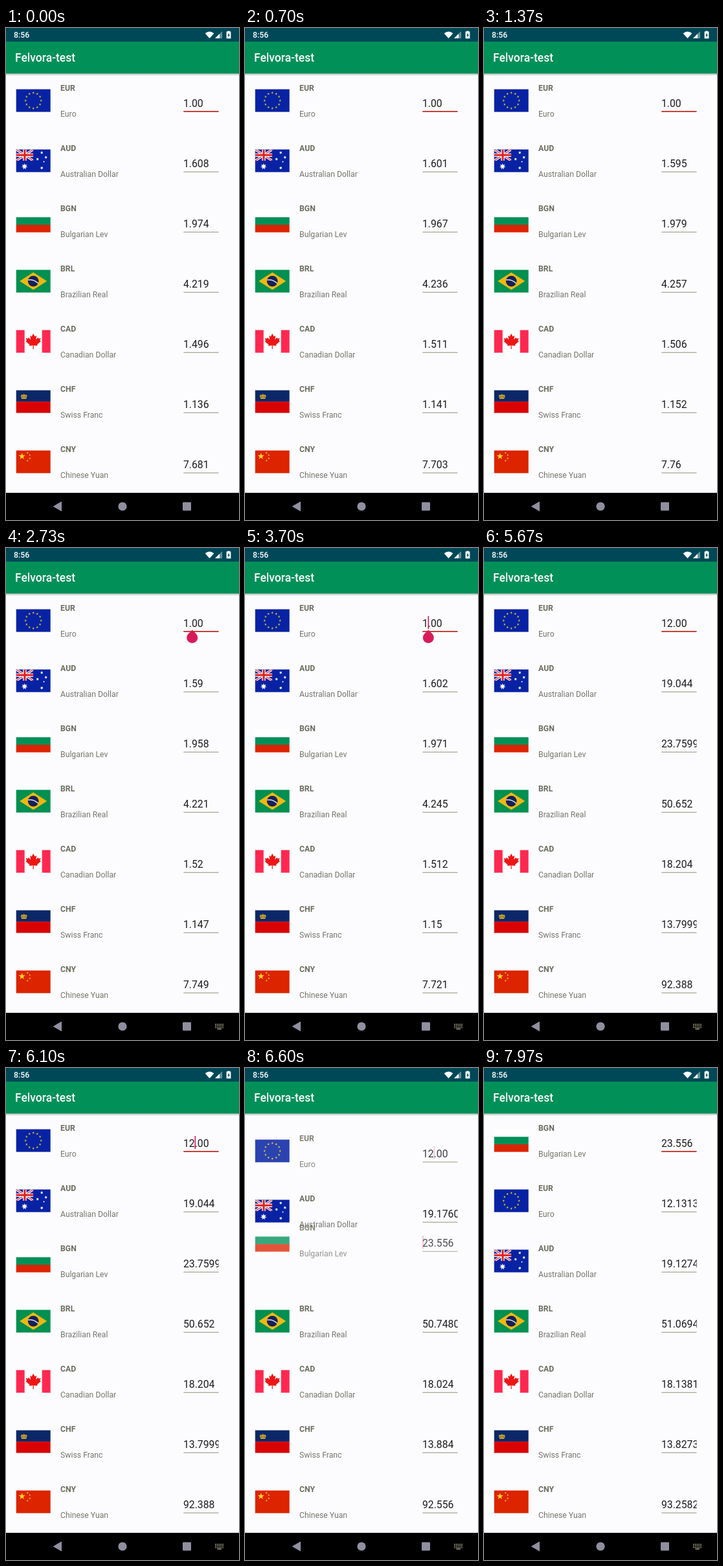
Write an HTML page that moves like this. It is 360 by 760 pixels and loops after 8 s.

```html
<!DOCTYPE html>
<html lang="en">
<head>
<meta charset="utf-8">
<title>Currency list</title>
<style>
  html, body { margin: 0; width: 100%; height: 100%; overflow: hidden; background: #fcfcff; }
  svg { display: block; width: 100vw; height: 100vh; font-family: Roboto, "Noto Sans", sans-serif; }
  .code { font-size: 12.25px; font-weight: 700; fill: #6c6c5e; }
  .name { font-size: 12.25px; fill: #75756a; }
  .value { font-size: 15.76px; fill: #1c1c1c; }
  .bar { font-weight: 500; fill: #fff; }
</style>
</head>
<body>
<svg id="stage" viewBox="0 0 360 760">
  <defs>
    <linearGradient id="shade" x1="0" y1="0" x2="0" y2="1">
      <stop offset="0" stop-color="#a9b7b4"/>
      <stop offset="1" stop-color="#fcfcff"/>
    </linearGradient>
    <clipPath id="field"><rect x="273" y="100" width="55.6" height="30"/></clipPath>
    <clipPath id="canton"><rect width="26.5" height="17.5"/></clipPath>
  </defs>
  <rect width="360" height="760" fill="#fcfcff"/>
  <g id="list"></g>

  <rect y="70" width="360" height="4" fill="url(#shade)"/>
  <rect y="20" width="360" height="50.3" fill="#009058"/>
  <rect width="360" height="21" fill="#004858"/>
  <text class="bar" x="12" y="15.4" font-size="12.3">8:56</text>
  <text class="bar" x="14" y="52.4" font-size="17.5">Felvora-test</text>
  <g fill="#fff">
    <path d="M307.6 8.2Q314.5 3 321.4 8.2L314.5 16Z"/>
    <path d="M323 16L334 5V16Z" opacity=".4"/>
    <path d="M323 16L330 9V16Z"/>
    <path d="M342.5 5.6V4.6H345.5V5.6H347.4V16.2H340.6V5.6Z"/>
    <path d="M344.6 7.5L342.2 11.6H343.7V14.6L346 10.4H344.6Z" fill="#004858"/>
  </g>

  <rect y="718" width="360" height="42" fill="#000"/>
  <g fill="#8f8fa0">
    <path d="M73.5 739L85.5 732V746Z" stroke="#8f8fa0" stroke-linejoin="round"/>
    <circle cx="180" cy="739" r="6.6"/>
    <rect x="273" y="732.5" width="13" height="13" rx="1"/>
  </g>
  <g id="keys" fill="#a2a284"></g>
</svg>

<script>
const LOOP = 8000, ROW = 93;
const TAP = 2200, DRAG = 3450, TYPE = 4000, PICK = 6270;
const MOVE = 6514, MOVE_MS = 320, RATE = 250;
const GREY = '#9a9a82', FOCUS = '#c03a32', ACCENT = '#d81b58';
const $ = id => document.getElementById(id);

const rect = (x, y, w, h, fill) =>
  `<rect x="${x}" y="${y}" width="${w}" height="${h}" fill="${fill}"/>`;
const path = (d, fill, extra = '') => `<path d="${d}" fill="${fill}" ${extra}/>`;

function star(x, y, r, fill, points = 5, inner = .4) {
  let d = '';
  for (let i = 0; i < points * 2; i++) {
    const a = Math.PI * i / points, k = i % 2 ? r * inner : r;
    d += (i ? 'L' : 'M') + (x + k * Math.sin(a)).toFixed(2) + ' ' + (y - k * Math.cos(a)).toFixed(2);
  }
  return path(d + 'Z', fill);
}

// Flags are drawn in a 53 x 35 box.
function euFlag() {
  let s = rect(0, 0, 53, 35, '#0822a4');
  for (let i = 0; i < 12; i++) {
    const a = i * Math.PI / 6;
    s += star(26.5 + 12 * Math.sin(a), 17.5 - 12 * Math.cos(a), 2, '#d8c820');
  }
  return s;
}

function auFlag() {
  const diag = 'M0 0L26.5 17.5M26.5 0L0 17.5', cross = 'M13.25 0V17.5M0 8.75H26.5';
  const line = (d, c, w) => path(d, 'none', `stroke="${c}" stroke-width="${w}"`);
  const stars = [[39.5, 5, 2.4], [46, 12.2, 2.4], [33, 15, 2.4], [39.5, 28.5, 2.6], [42.8, 19, 1.5]];
  return rect(0, 0, 53, 35, '#0822a4') + '<g clip-path="url(#canton)">' +
    line(diag, '#fff', 3.6) + line(diag, '#e02830', 1.2) +
    line(cross, '#fff', 5.4) + line(cross, '#e02020', 3) + '</g>' +
    star(13, 26.3, 5, '#fff', 7, .46) +
    stars.map(([x, y, r]) => star(x, y, r, '#fff', 7, .46)).join('');
}

function brFlag() {
  return rect(0, 0, 53, 35, '#009050') +
    path('M26.5 4L47.5 17.5L26.5 31L5.5 17.5Z', '#f0b810') +
    '<circle cx="26.5" cy="17.5" r="8.4" fill="#14205c"/>' +
    path('M18.6 15.6Q27.5 14.4 34 20.8', 'none', 'stroke="#dfe6e8" stroke-width="1.5"');
}

function caFlag() {
  const half = [[0, -12], [2.4, -7.6], [5, -8.8], [3.9, -2.6], [7.3, -6], [8, -4.3], [11.5, -4.8],
    [10.2, -1.2], [11.8, -.2], [5.8, 4.8], [6.4, 7], [.6, 6.2], [.6, 12]];
  const all = half.concat(half.slice().reverse().map(([x, y]) => [-x, y]));
  const d = 'M' + all.map(([x, y]) => `${26.5 + x} ${17.5 + y}`).join('L') + 'Z';
  return rect(0, 0, 53, 35, '#fff') + rect(0, 0, 13, 35, '#ff2850') +
    rect(40, 0, 13, 35, '#ff2850') + path(d, '#f01414');
}

function liFlag() {
  return rect(0, 0, 53, 17.5, '#0a2868') + rect(0, 17.5, 53, 17.5, '#d80404') +
    path('M8.5 13.5L7 8.5Q7.5 6 11 7.2L12 5L13 7.2Q16.5 6 17 8.5L15.5 13.5Z', '#c0a030') +
    path('M9 10.2H11M13 10.2H15', 'none', 'stroke="#4c4830" stroke-width="1.3"');
}

function cnFlag() {
  return rect(0, 0, 53, 35, '#dc2400') + star(9, 9, 5.3, '#ffd820') +
    [[17.5, 3.6], [21, 7], [21, 12.2], [17.5, 15.8]]
      .map(([x, y]) => star(x, y, 1.8, '#f8c020')).join('');
}

const bgFlag = () => rect(0, 0, 53, 12, '#fff') +
  rect(0, 11.7, 53, 11.8, '#009058') + rect(0, 23.4, 53, 11.6, '#dc2400');

const CURRENCIES = [
  ['EUR', 'Euro', euFlag],
  ['AUD', 'Australian Dollar', auFlag],
  ['BGN', 'Bulgarian Lev', bgFlag],
  ['BRL', 'Brazilian Real', brFlag],
  ['CAD', 'Canadian Dollar', caFlag],
  ['CHF', 'Swiss Franc', liFlag],
  ['CNY', 'Chinese Yuan', cnFlag]
];

// One line per refresh, a second apart.
const RATES = [
  '1.00 1.608 1.974 4.219 1.496 1.136 7.681',
  '1.00 1.601 1.967 4.236 1.511 1.141 7.703',
  '1.00 1.595 1.979 4.257 1.506 1.152 7.76',
  '1.00 1.59 1.958 4.221 1.52 1.147 7.749',
  '1.00 1.602 1.971 4.245 1.512 1.15 7.721',
  '12.00 19.308 23.7000 51.036 18.096 13.884 93.336',
  '12.00 19.044 23.7599 50.652 18.204 13.7999 92.388',
  '12.00 19.1760 23.556 50.7480 18.024 13.884 92.556',
  '12.1313 19.1274 23.556 51.0694 18.1381 13.8273 93.2582'
].map(s => s.split(' '));

$('list').innerHTML = CURRENCIES.map(([code, name, flag]) => `<g>
  <g transform="translate(15.7 94.6)">${flag()}</g>
  <text class="code" x="84" y="97.3">${code}</text>
  <text class="name" x="84" y="136.6">${name}</text>
  <g clip-path="url(#field)"><text class="value" x="274" y="121.8"></text></g>
  <rect class="line" x="274.3" width="54.2"/>
  <rect class="caret" y="105" width="1.6" height="20" fill="${ACCENT}" opacity="0"/>
  </g>`).join('') +
  `<path id="handle" d="M0 126.5L6 132.5A8.5 8.5 0 1 1 -6 132.5Z" fill="${ACCENT}"/>`;

let dots = '';
for (let r = 0; r < 3; r++)
  for (let c = 0; c < 5; c++) dots += `<rect x="${323 + c * 2.8}" y="${735 + r * 2.5}" width="1.7" height="1.5"/>`;
$('keys').innerHTML = dots + '<rect x="326.5" y="742.3" width="6.5" height="1.4"/>';

const rows = [...$('list').children].slice(0, CURRENCIES.length).map(g => ({
  g,
  value: g.querySelector('.value'),
  line: g.querySelector('.line'),
  caret: g.querySelector('.caret')
}));

const show = (el, on) => el.setAttribute('opacity', +on);
const blink = (t, from) => t >= from && (t - from) % 1000 < 500;

function caretAt(row, x, alpha) {
  row.caret.setAttribute('x', x);
  show(row.caret, alpha);
}

function draw(t) {
  const k = Math.min(1, Math.max(0, (t - MOVE) / MOVE_MS));
  const p = (1 - Math.cos(Math.PI * k)) / 2;
  const rates = RATES[Math.floor((t - RATE) / 1000) + 1];
  const focused = t < PICK ? 0 : k === 1 ? 2 : -1;
  const shift = [p, p, -2 * p];
  const fade = p * (1 - p);

  rows.forEach((row, i) => {
    row.g.setAttribute('transform', `translate(0 ${ROW * (i + (shift[i] || 0))})`);
    const text = i === 0 && t >= TYPE && t < RATE + 4000 ? '12.00' : rates[i];
    if (row.value.textContent !== text) row.value.textContent = text;
    const on = i === focused;
    row.line.setAttribute('y', on ? 128 : 128.7);
    row.line.setAttribute('height', on ? 1.9 : 1.1);
    row.line.setAttribute('fill', on ? FOCUS : GREY);
  });
  show(rows[0].g, 1 - fade);
  show(rows[2].g, 1 - 1.6 * fade);

  const start = t >= TYPE ? TYPE : t >= DRAG ? DRAG : TAP;
  const x = t >= TYPE ? 291.5 : t >= DRAG ? 282.5 : 286.8;
  const ghost = t >= MOVE && k < 1 ? .35 * (1 - p) : 0;
  caretAt(rows[0], x, t < PICK ? blink(t, start) : ghost);
  caretAt(rows[2], 274.2, blink(t, PICK) ? (k > 0 && k < 1 ? .4 : 1) : 0);

  const handle = $('handle');
  show(handle, t >= TAP && t < TYPE);
  handle.setAttribute('transform', `translate(${t < DRAG ? 287.7 : 283.3} 0)`);
  show($('keys'), t >= TAP);
}

const origin = performance.now();
function tick() {
  draw((performance.now() - origin) % LOOP);
  requestAnimationFrame(tick);
}
tick();
</script>
</body>
</html>
```
